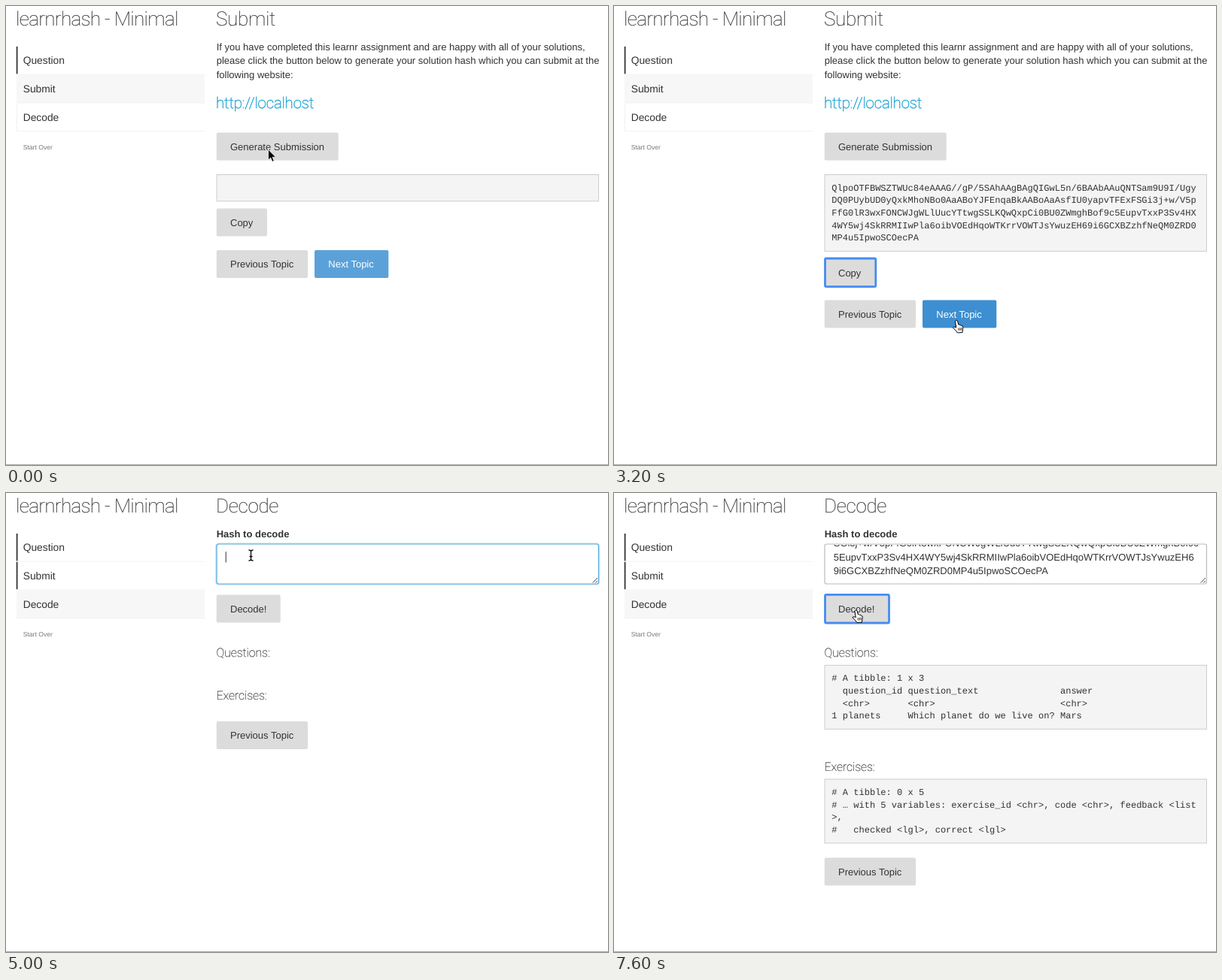
Recreate the animation shown at these times as an HTML page. Size 800 px wide and 611 px high, loop 7800 ms.

```html
<!DOCTYPE html>
<html lang="en">
<head>
<meta charset="utf-8">
<style>
html, body { margin: 0; width: 100%; height: 100%; overflow: hidden; background: #fff; }
svg { display: block; width: 800px; height: 611px; }
text { font: 13px "Liberation Sans", Arial, sans-serif; fill: #333; white-space: pre; text-rendering: geometricPrecision; }
.title, .link, .head { font-family: Roboto, sans-serif; font-weight: 200; stroke: #333; stroke-width: .2px; }
.title { font-size: 26px; letter-spacing: -.3px; }
.name { letter-spacing: -.65px; }
.link { font-size: 20.5px; letter-spacing: -.15px; fill: #0a9bd0; stroke: #0a9bd0; stroke-width: .4px; }
.head { font-size: 16px; letter-spacing: -.1px; }
.menu { font-size: 13.8px; }
.small { font-size: 8.6px; fill: #777; }
.bold { font-weight: bold; }
.white { fill: #fff; }
.code { font: 12.05px "Liberation Mono", "Courier New", monospace; }
</style>
</head>
<body>
<svg id="stage" viewBox="0 0 800 611"></svg>
<script>
const stage = document.getElementById('stage');
const STEP = 200, LOOP = 7800;
const GREY = '#dcdcdc', DARK = '#c3c3c3', BLUE = '#5ba1d9', DEEP = '#3d8fd1';

const HASH = [
  'QlpoOTFBWSZTWUc84eAAAG//gP/5SAhAAgBAgQIGwL5n/6BAAbAAuQNTSam9U9I/Ugy',
  'DQ0PUybUD0yQxkMhoNBo0AaABoYJFEnqaBkAABoAaAsfIU0yapvTFExFSGi3j+w/V5p',
  'FfG0lR3wxFONCWJgWLlUucYTtwgSSLKQwQxpCi0BU0ZWmghBof9c5EupvTxxP3Sv4HX',
  '4WY5wj4SkRRMIIwPla6oibVOEdHqoWTKrrVOWTJsYwuzEH69i6GCXBZzhfNeQM0ZRD0',
  'MP4u5IpwoSCOecPA'
];
const PASTED = [
  'SGi3j+w/V5pFfG0lR3wxFONCWJgWLlUucYTtwgSSLKQwQxpCi0BU0ZWmghBof9c',
  '5EupvTxxP3Sv4HX4WY5wj4SkRRMIIwPla6oibVOEdHqoWTKrrVOWTJsYwuzEH6',
  '9i6GCXBZzhfNeQM0ZRD0MP4u5IpwoSCOecPA'
];
const QUESTIONS = [
  '# A tibble: 1 x 3',
  '  question_id question_text               answer',
  '  <chr>       <chr>                       <chr>',
  '1 planets     Which planet do we live on? Mars'
];
const EXERCISES = [
  '# A tibble: 0 x 5',
  '# … with 5 variables: exercise_id <chr>, code <chr>, feedback <list',
  '>,',
  '#   checked <lgl>, correct <lgl>'
];

// step, shape, x, y of the pointer's hot spot
const PATH = [
  [0, 'arrow', 348.5, 191], [1, 'hand', 350.5, 191.5], [5, 'hand', 350.5, 191.5],
  [6, 'arrow', 348, 209], [7, 'beam', 343, 240], [8, 'beam', 337, 300],
  [9, 'arrow', 332, 328], [10, 'hand', 330, 350.5], [11, 'hand', 330, 350.5],
  [12, 'arrow', 460, 394], [13, 'hand', 456, 408], [14, 'hand', 455, 418],
  [18, 'hand', 455, 418], [19, 'arrow', 454, 420], [20, 'arrow', 454, 420],
  [23, 'arrow', 372, 155], [24, 'beam', 325.5, 83], [27, 'beam', 325.5, 83],
  [28, 'beam', 326, 100], [29, 'arrow', 326, 131], [31, 'arrow', 326, 131],
  [32, 'hand', 322, 143], [34, 'hand', 321.5, 155.5], [39, 'hand', 321.5, 155.5]
];
const SHAPES = {
  arrow: '<path d="M0 0V14L3.2 11 5.4 16.2 7.8 15.2 5.6 10.2H10Z" fill="#000" stroke="#fff" stroke-width=".8"/>',
  hand: '<path d="M-1.6 1.6Q0-1 1.6 1.4L2.8 6.2Q4.4 5.2 5.2 7 6.8 6.2 7.2 8 8.8 7.8 8.8 9.6L8.4 13 8 16.6 1.4 17Q-.5 13.5-4.4 10.6-4.6 8.2-.2 10Z" fill="#fff" stroke="#000"/>' +
    '<path d="M2.6 10.5L3 14M4.6 10.3L5 14M6.5 10L6.8 13.7" stroke="#000" stroke-width=".8"/>',
  beam: '<path d="M-3-7Q0-7 0-5Q0-7 3-7M0-5V5M-3 7Q0 7 0 5Q0 7 3 7M-2 1.5H2" fill="none" stroke="#000" stroke-width="1.3"/>'
};

const escape = s => s.replace(/</g, '&lt;').replace(/>/g, '&gt;');
const text = (x, y, s, cls = '') => `<text x="${x}" y="${y}" class="${cls}">${escape(s)}</text>`;
const rect = (x, y, w, h, fill, more = '') =>
  `<rect x="${x}" y="${y}" width="${w}" height="${h}" fill="${fill}" ${more}/>`;
const lines = (x, y, gap, list, cls) => list.map((s, i) => text(x, y + i * gap, s, cls)).join('');

function button(x, y, w, label, fill = GREY, focus = false) {
  const ring = focus ? rect(x + .8, y - .1, w, 37.6, 'none', 'rx="1.5" stroke="#468cf0" stroke-width="2.8"') : '';
  return rect(x, y, w, 37, fill, 'rx="2"') + ring +
    text(x + 18.3, y + 23.4, label, fill === BLUE || fill === DEEP ? 'white' : '');
}

function output(y, h, list) {
  return rect(280, y, 507.5, h, '#f4f4f4', 'stroke="#ccc" stroke-width="1"') +
    lines(289.3, y + 21, 16.7, list, 'code');
}

function sidebar(active, seen) {
  let s = text(13, 26, 'learnrhash - Minimal', 'title name') + rect(14, 54, 1, 113, '#f1f1f1');
  ['Question', 'Submit', 'Decode'].forEach((label, i) => {
    const y = 53.5 + i * 37.8;
    if (i === active) s += rect(14, y, 250, 37.8, '#f7f7f7');
    s += rect(14, y + 37.3, 250, .8, '#f0f0f0');
    if (i < seen) s += rect(13.7, y + .5, 1.8, 36.3, '#333');
    s += text(22.7, y + 23.4, label, 'menu');
  });
  return s + text(22.7, 191, 'Start Over', 'small');
}

function submitPage(n) {
  const done = n >= 3, drop = done ? 66.6 : 0;
  return text(279, 26, 'Submit', 'title') +
    lines(279.7, 58.5, 18.5, [
      'If you have completed this learnr assignment and are happy with all of your solutions,',
      'please click the button below to generate your solution hash which you can submit at the',
      'following website:'
    ]) +
    text(279, 135.5, 'http://localhost', 'link') +
    button(279.7, 168.5, 162, 'Generate Submission', n === 1 ? DARK : GREY, n >= 2 && n < 11) +
    output(224.5, 35.3 + drop, done ? HASH : []) +
    button(279.7, 269.5 + drop, 67.3, 'Copy', n === 10 || n === 11 ? DARK : GREY, n >= 11) +
    button(279.7, 325 + drop, 121.3, 'Previous Topic') +
    button(410, 325 + drop, 98.3, 'Next Topic', n >= 13 ? DEEP : BLUE) +
    (n === 11 ? '<circle cx="329" cy="351" r="28" fill="none" stroke="#111" stroke-width="1.3"/>' : '');
}

function decodePage(n) {
  const focus = n >= 25 && n < 36, done = n >= 37;
  const glow = focus ? rect(280, 68, 507.5, 53, 'none', 'rx="3" stroke="#d5eaf7" stroke-width="4"') : '';
  return `<g transform="translate(0 ${n === 19 ? -19.5 : 0})">` +
    text(279, 26, 'Decode', 'title') +
    text(279.7, 58.5, 'Hash to decode', 'bold') +
    glow + rect(280, 68, 507.5, 53, '#fff', `rx="2.5" stroke="${focus ? '#4fa9de' : '#bbb'}" stroke-width="1.2"`) +
    '<path d="M779.5 119.5L786 113M783.5 119.5L786 117" stroke="#555" stroke-width="1"/>' +
    (n >= 25 && n <= 27 ? rect(291.7, 78, 1, 14.5, '#333') : '') +
    (n >= 31 ? `<g clip-path="url(#field)">${lines(291.7, 71.2, 18.5, PASTED)}</g>` : '') +
    button(279.7, 135.5, 85, 'Decode!', n >= 32 && n < 36 ? DARK : GREY, n >= 36) +
    text(279.5, 218, 'Questions:', 'head') +
    (done ? output(229.3, 85, QUESTIONS) + output(381, 85, EXERCISES) : '') +
    text(279.5, done ? 370 : 274.5, 'Exercises:', 'head') +
    button(279.7, done ? 485.5 : 304, 121.3, 'Previous Topic') + '</g>';
}

function pointer(n) {
  const i = PATH.findIndex(k => k[0] > n);
  const [from, shape, x, y] = PATH[i - 1], [to, , x2, y2] = PATH[i];
  const p = (n - from) / (to - from);
  return `<g transform="translate(${x + (x2 - x) * p} ${y + (y2 - y) * p})">${SHAPES[shape]}</g>`;
}

let shown = -1;
function draw(now) {
  const n = Math.floor(now % LOOP / STEP);
  if (n !== shown) {
    shown = n;
    const decoding = n >= 19;
    stage.innerHTML =
      `<clipPath id="field">${rect(281, 69, 505, 51.5, '#000')}</clipPath>` +
      sidebar(decoding ? 2 : 1, n >= 20 ? 2 : 1) +
      (decoding ? decodePage(n) : submitPage(n)) +
      rect(0, 610, 800, 1, '#aaa') + pointer(n);
  }
  requestAnimationFrame(() => draw(performance.now()));
}
draw(performance.now());
</script>
</body>
</html>
```
